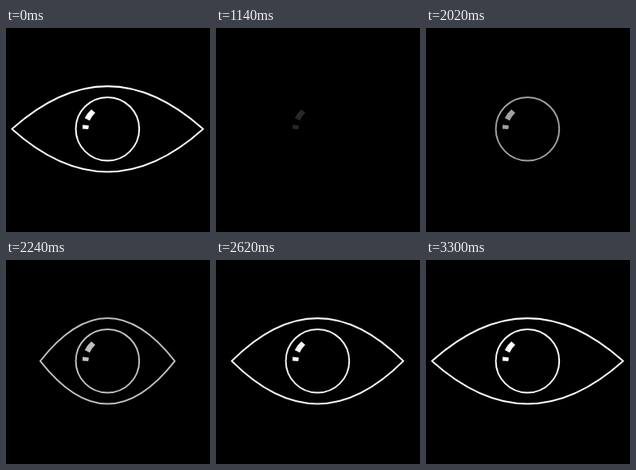
These frames come from a looping animation (256x256 px, 3330 ms). An HTML page:

```html
<!DOCTYPE html>
<html lang="en">
<head>
<meta charset="utf-8">
<title>Eye</title>
<style>
  html, body { margin: 0; width: 100%; height: 100%; overflow: hidden; background: #000; }
  svg { display: block; width: 100%; height: 100%; }
</style>
</head>
<body>
<svg viewBox="0 0 256 256">
  <g fill="none" stroke="#fff" stroke-width="2" stroke-linejoin="round">
    <path id="lids"/>
    <circle id="iris" cx="127.4" cy="126.7" r="39.8"/>
  </g>
  <g id="glints" fill="#fff">
    <path d="M107.2 102.3L112 106.6Q107.5 110.8 105 116.2L98.8 113Q101.8 106.8 107.2 102.3Z"/>
    <path d="M96.2 121.4L104 122.4L103.2 127L96 126.4Z"/>
  </g>
</svg>
<script>
const LOOP = 3330, BLACK = 850;
const [lids, iris, glints] = ["lids", "iris", "glints"].map(id => document.getElementById(id));
const ramp = (t, from, to) => Math.min(1, Math.max(0, (t - from) / (to - from)));
const easeInOut = p => (1 - Math.cos(Math.PI * p)) / 2;

function drawLids(half) {
  const cx = 127.4, cy = 126.8, bend = 107.4;
  const left = cx - half, right = cx + half;
  lids.setAttribute("d",
    `M${left} ${cy}Q${cx} ${cy - bend} ${right} ${cy}Q${cx} ${cy + bend} ${left} ${cy}Z`);
}

function render(t) {
  const closing = t < BLACK;
  const fade = closing ? 1 - ramp(t, 550, BLACK) : ramp(t, BLACK, 2700);
  const reveal = (from, to) => closing ? fade : Math.min(fade, ramp(t, from, to));
  glints.setAttribute("opacity", fade);
  iris.setAttribute("opacity", reveal(1140, 2240));
  lids.setAttribute("opacity", reveal(2050, 2200));
  // The lids widen sideways while keeping their height
  drawLids(closing ? 120 : 72 + 48 * easeInOut(ramp(t, 1840, 3020)));
}

const start = performance.now();
function tick() {
  render((performance.now() - start) % LOOP);
  requestAnimationFrame(tick);
}
tick();
</script>
</body>
</html>
```
